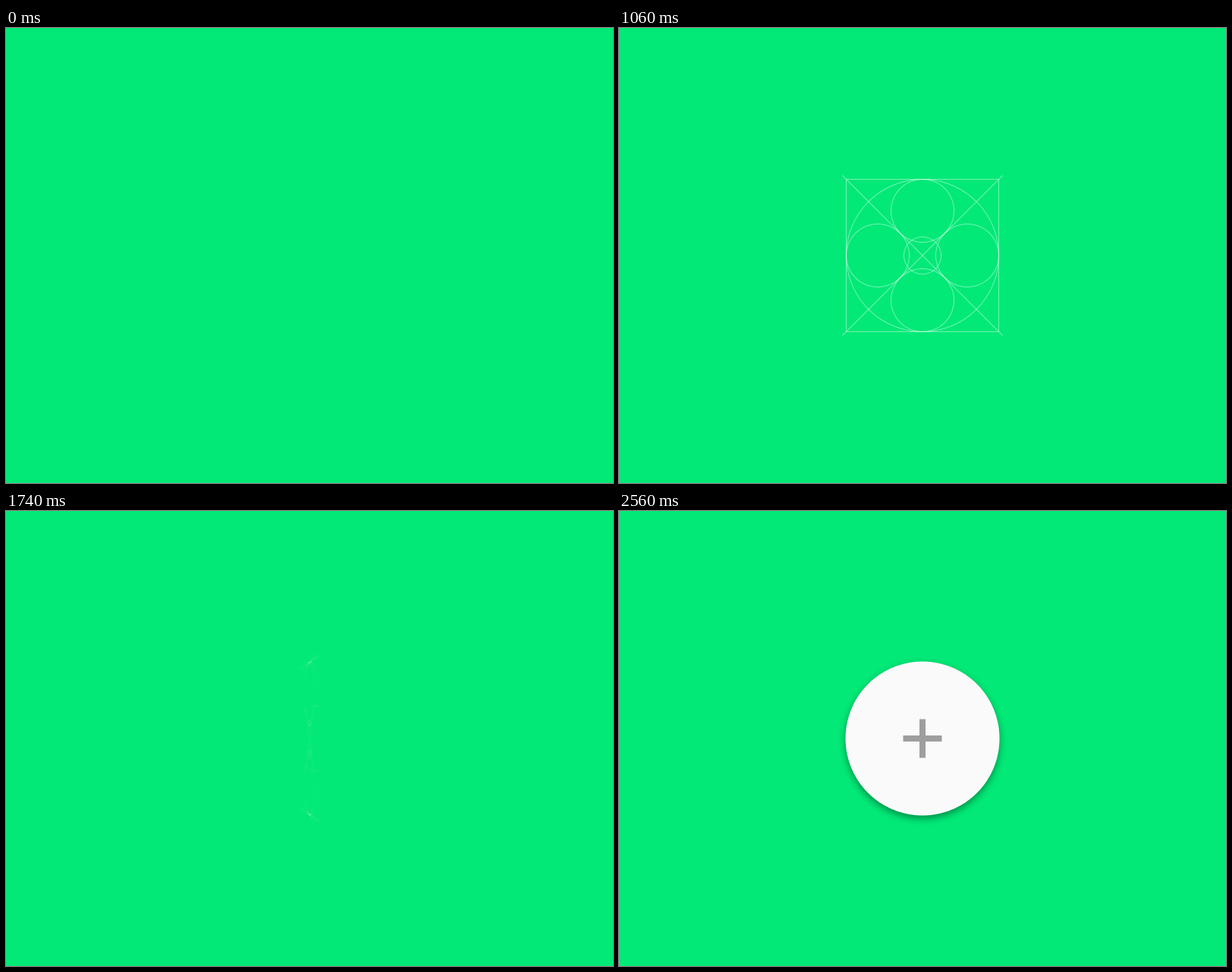
These frames come from a looping animation (800 by 600 pixels, 6000 ms). An HTML page with a canvas:

```html
<!DOCTYPE html>
<html lang="en">
<head>
<meta charset="utf-8">
<title>Button construction</title>
<style>
  html, body { margin: 0; width: 100%; height: 100%; overflow: hidden; background: #02e977; }
  canvas { display: block; width: 800px; height: 600px; }
</style>
</head>
<body>
<canvas id="stage" width="800" height="600"></canvas>
<script>
const W = 800, H = 600, LOOP = 6000, STEP = 20;
const BG = '#02e977', LINE = 'rgba(255,255,255,.44)', PAPER = '#fafafa', ICON = '#9e9e9e';
const CAMERA = 1111, SHUTTER = 10, SAMPLES = 8;

const REVEAL = { from: 354, to: 1062, radius: 150, ease: bezier(.667, .667) };
const FLIP = { from: 1470, to: 2020, ease: bezier(.667, .333) };
const FADE = { from: 2220, to: 2560, ease: u => u };

const screen = document.getElementById('stage').getContext('2d');
const layer = document.createElement('canvas');
layer.width = W;
layer.height = H;
const ctx = layer.getContext('2d');

// Cubic bezier easing with flat ends: control points (x1, 0) and (x2, 1).
function bezier(x1, x2) {
  return u => {
    let lo = 0, hi = 1, s = .5;
    for (let i = 0; i < 30; i++) {
      s = (lo + hi) / 2;
      const r = 1 - s;
      if (3 * x1 * s * r * r + 3 * x2 * s * s * r + s * s * s < u) lo = s; else hi = s;
    }
    return s * s * (3 - 2 * s);
  };
}

function progress(phase, t) {
  const u = (t - phase.from) / (phase.to - phase.from);
  return u <= 0 ? 0 : u >= 1 ? 1 : phase.ease(u);
}

// Outlines in card space, with the origin at the centre of the stage.
const circle = (cx, cy, r, n = 120) => Array.from({ length: n }, (_, i) => {
  const a = i / n * 2 * Math.PI;
  return [cx + r * Math.cos(a), cy + r * Math.sin(a)];
});
const rect = (w, h) => [[-w, -h], [w, -h], [w, h], [-w, h]];
const ring = (cx, cy, r) => [circle(cx, cy, r + .5), circle(cx, cy, r - .5)];
const diagonal = dir => {
  const e = 105.7, n = .36;
  return [[[-e - n, (-e + n) * dir], [-e + n, (-e - n) * dir],
           [e + n, (e - n) * dir], [e - n, (e + n) * dir]]];
};

const guides = [
  [rect(101, 101), rect(100, 100)],
  ring(0, 0, 100.5),
  ring(0, 0, 24.5),
  ring(0, -59, 41.5), ring(0, 59, 41.5), ring(-59, 0, 41.5), ring(59, 0, 41.5),
  diagonal(1), diagonal(-1)
];
const disc = [circle(0, 0, 101.5, 180)];
const plus = [rect(25.5, 4), rect(4, 25.5)];

// Fills outlines turned about the vertical axis, seen in perspective.
function fill(loops, angle, color, rule = 'evenodd') {
  const c = Math.cos(angle), s = Math.sin(angle);
  ctx.beginPath();
  for (const loop of loops) {
    loop.forEach(([x, y], i) => {
      const k = 1 / (1 - x * s / CAMERA);
      ctx[i ? 'lineTo' : 'moveTo'](W / 2 + x * c * k, H / 2 + y * k);
    });
    ctx.closePath();
  }
  ctx.fillStyle = color;
  ctx.fill(rule);
}

function drawCard(t) {
  const angle = Math.PI * progress(FLIP, t);
  const reveal = REVEAL.radius * progress(REVEAL, t);
  ctx.fillStyle = BG;
  ctx.fillRect(0, 0, W, H);

  ctx.save();
  if (t < REVEAL.to) {
    ctx.beginPath();
    ctx.arc(W / 2, H / 2, reveal, 0, 2 * Math.PI);
    ctx.clip();
  }
  ctx.globalAlpha = 1 - progress(FADE, t);
  for (const guide of guides) fill(guide, angle, LINE);
  ctx.restore();

  if (angle <= Math.PI / 2) return;
  ctx.save();
  ctx.shadowColor = 'rgba(0,0,0,.4)';
  ctx.shadowBlur = 10;
  ctx.shadowOffsetY = 4;
  fill(disc, angle, PAPER);
  ctx.restore();
  fill(plus, angle, ICON, 'nonzero');
}

function render(t) {
  // Average several moments while the card turns, for motion blur.
  const turning = t > FLIP.from && t < FLIP.to;
  const n = turning ? SAMPLES : 1;
  for (let i = 0; i < n; i++) {
    drawCard(t + ((i + .5) / n - .5) * (turning ? SHUTTER : 0));
    screen.globalAlpha = 1 / (i + 1);
    screen.drawImage(layer, 0, 0);
  }
}

const start = performance.now();
let shown = -1;
function tick() {
  const t = Math.floor(((performance.now() - start) % LOOP + 1) / STEP) * STEP % LOOP;
  if (t !== shown) render(shown = t);
  requestAnimationFrame(tick);
}
tick();
</script>
</body>
</html>
```
